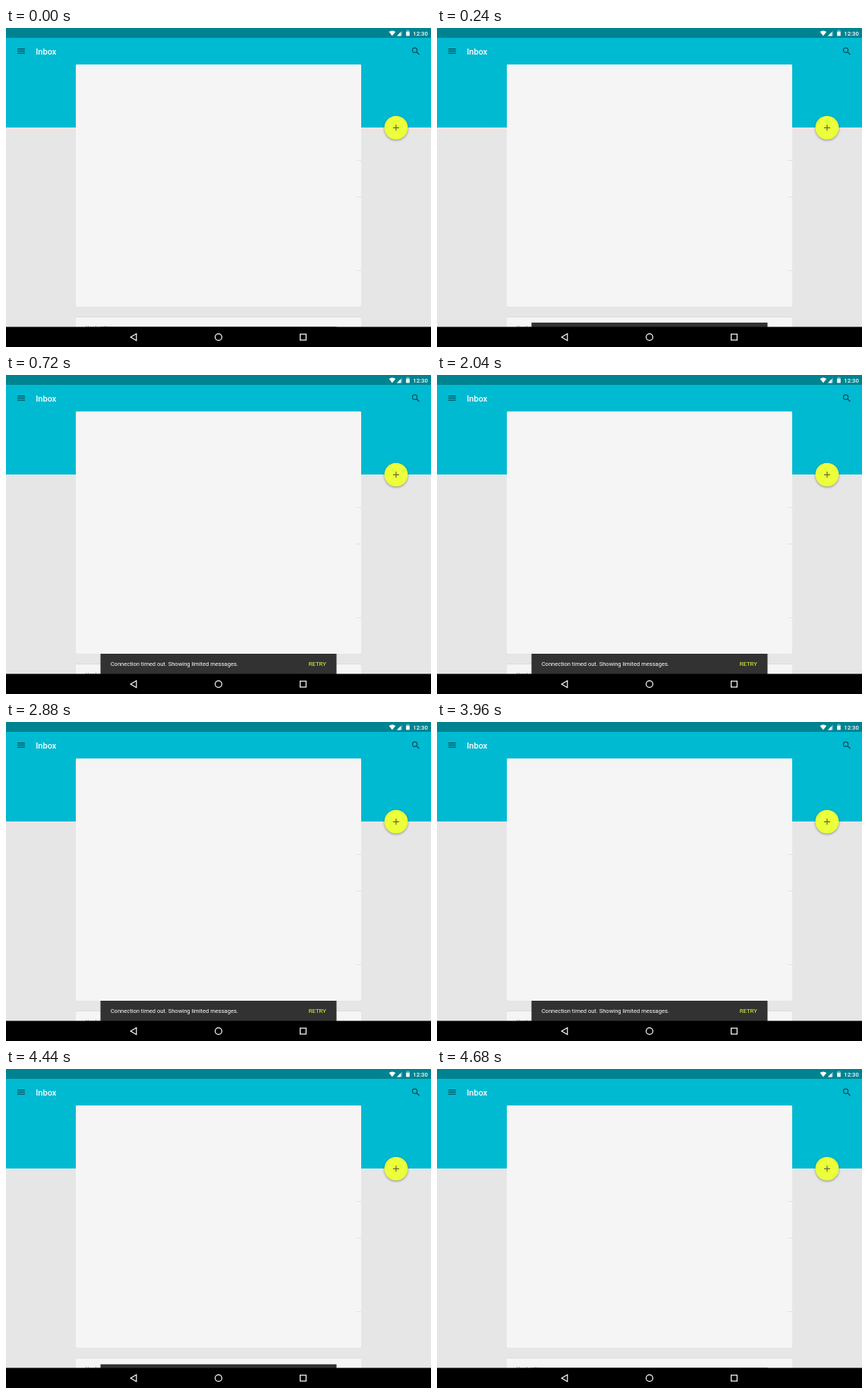
An HTML page that plays this animation: 560 px wide and 420 px high, repeating every 5400 ms.

```html
<!DOCTYPE html>
<html lang="en">
<head>
<meta charset="utf-8">
<title>Inbox snackbar</title>
<style>
  html, body { margin: 0; width: 100%; height: 100%; overflow: hidden; }
  svg { display: block; width: 560px; height: 420px; font: 7.55px Roboto, sans-serif; }
  .card { fill: #f5f5f5; filter: drop-shadow(0 .7px .7px #0005); }
  .medium { font-weight: 500; fill: #fff; }
  .icon { fill: none; stroke: #0b4f5a; stroke-width: 1.2; }
  .nav { fill: none; stroke: #fff; stroke-width: 1.2; }
</style>
</head>
<body>
<svg viewBox="0 0 560 420">
  <rect width="560" height="420" fill="#e6e6e6"/>
  <rect width="560" height="131" fill="#00bad2"/>
  <rect width="560" height="13" fill="#008391"/>

  <g fill="#fff">
    <path d="M504.6 4.9Q508.9 1.9 513.2 4.9L508.9 10.4Z"/>
    <path d="M515 10.4L522 3.4V10.4Z" opacity=".35"/>
    <path d="M515 10.4L520.2 5.2V10.4Z"/>
    <path d="M527.2 3.3H528.5V2.5H530.5V3.3H531.8V5H527.2Z" opacity=".4"/>
    <path d="M527.2 5H531.8V10.4H527.2Z"/>
  </g>
  <text class="medium" x="536.3" y="9.7" font-size="7.73">12:30</text>

  <path class="icon" d="M14.9 27.6H24.9M14.9 30.4H24.9M14.9 33.2H24.9"/>
  <text class="medium" x="39.2" y="34.7" font-size="11.04">Inbox</text>
  <g class="icon">
    <circle cx="538.6" cy="29.2" r="3.1"/>
    <path d="M540.9 31.5L544.5 35.1" stroke-width="1.4"/>
  </g>

  <rect class="card" x="92" y="48" width="376" height="319" rx="1"/>
  <path d="M462 174.5H468M462 222.5H468M462 319.5H468" stroke="#e2e2e2"/>
  <rect class="card" x="92" y="380.7" width="376" height="40" rx="1"/>
  <text x="104.8" y="396.8" font-size="7.8" fill="#888">Yesterday</text>

  <circle cx="514" cy="131.2" r="15.5" fill="#ebff3b" style="filter:drop-shadow(0 1.6px 1.6px #0006)"/>
  <path d="M510 131.3H518M514 127.3V135.3" stroke="#676d2c" stroke-width="1.2"/>

  <g id="snackbar">
    <rect x="124.5" width="311" height="28" fill="#323232"/>
    <g id="label">
      <text x="137.7" y="16.1" fill="#fff">Connection timed out. Showing limited messages.</text>
      <text x="398.8" y="16.1" font-size="7.73" fill="#ebff3b">RETRY</text>
    </g>
  </g>

  <rect y="393.5" width="560" height="26.5"/>
  <g class="nav">
    <path d="M164.2 407L171.8 402.6V411.4Z"/>
    <circle cx="280" cy="407" r="4.4"/>
    <rect x="387.6" y="403.1" width="7.8" height="7.8"/>
  </g>
</svg>
<script>
  const LOOP = 5400, STEP = 120, SLIDE = 500;
  const ENTER = 120, EXIT = 4170;
  const HIDDEN_Y = 393.5, HEIGHT = 26.5;
  const snackbar = document.getElementById('snackbar');
  const label = document.getElementById('label');
  const clamp = v => Math.min(1, Math.max(0, v));

  // cubic-bezier(.4, 0, .2, 1), solved by bisection
  function ease(x) {
    let low = 0, high = 1;
    for (let i = 0; i < 20; i++) {
      const s = (low + high) / 2, r = 1 - s;
      if (1.2 * s * r * r + .6 * s * s * r + s ** 3 < x) low = s; else high = s;
    }
    return low * low * (3 - 2 * low);
  }

  const start = performance.now();
  function draw() {
    const elapsed = (performance.now() - start) % LOOP;
    const t = Math.floor(elapsed / STEP) * STEP;
    const enter = clamp((t - ENTER) / SLIDE), exit = clamp((t - EXIT) / SLIDE);
    const shown = ease(enter) - ease(exit);
    snackbar.setAttribute('transform', `translate(0 ${HIDDEN_Y - HEIGHT * shown})`);
    label.setAttribute('opacity', enter - exit);
    requestAnimationFrame(draw);
  }
  draw();
</script>
</body>
</html>
```
